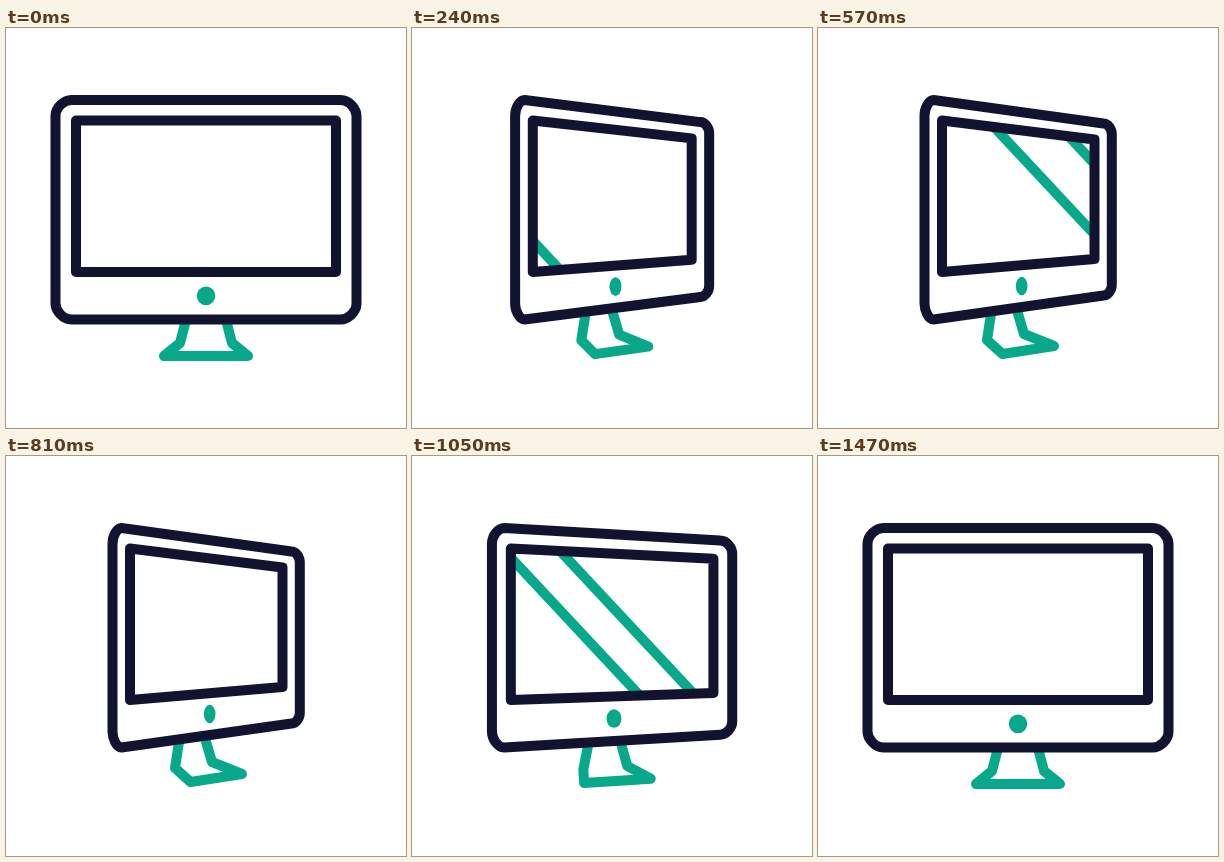
Animation of 400x400 px, one loop 1.62 s. Source, as an HTML page:

```html
<!DOCTYPE html>
<html lang="en">
<head>
<meta charset="utf-8">
<title>Turning monitor</title>
<style>
  html, body { margin: 0; height: 100%; overflow: hidden; background: #fff; }
  svg { display: block; width: 100%; height: 100%; }
  path { fill: none; stroke-width: 10; stroke-linejoin: round; }
  .dark { stroke: #121331; }
  .green { stroke: #08a88a; }
</style>
</head>
<body>
<svg viewBox="0 0 400 400">
  <clipPath id="glass"><path id="glassShape"/></clipPath>
  <path id="stand" class="green"/>
  <path id="streaks" class="green" clip-path="url(#glass)"/>
  <path id="screen" class="dark"/>
  <path id="body" class="dark"/>
  <ellipse id="dot" ry="9.3" fill="#08a88a"/>
</svg>
<script>
const LOOP = 1620, STEP = 30, TURN = 290, TURN_END = 1200;
const STREAK_SPEED = 0.69, STREAK_SLOPE = 1.07;

// Each sweep: a moment and where its two streaks cross y = 97 then.
const sweeps = [
  { time: 390, xs: [116, 50] },
  { time: 1050, xs: [150, 94.5] }
];

const $ = id => document.getElementById(id);
const mix = (a, b, k) => a + (b - a) * k;
const easeInOut = u => u < 0.5 ? 2 * u * u : 1 - 2 * (1 - u) ** 2;

// Fraction of the turn: out, hold, and back again.
function turnAt(t) {
  const u = Math.min(t, TURN_END - t) / TURN;
  return easeInOut(Math.max(0, Math.min(1, u)));
}

function setPath(id, d) {
  $(id).setAttribute('d', d);
}

function bodyPath(k) {
  const left = mix(49.5, 106.5, k), right = mix(350.5, 293.8, k);
  const x1 = mix(65.5, 115.5, k), x2 = mix(334.5, 285.5, k);
  const top = mix(72, 95.5, k), bottom = mix(291.5, 267.5, k);
  const y1 = mix(88, 106, k), y2 = mix(275.5, 257, k);
  const bow = 0.45;
  const corner = (ax, ay, bx, by, vertical) => vertical
    ? `C${ax} ${mix(by, ay, bow)} ${mix(ax, bx, 1 - bow)} ${by} ${bx} ${by}`
    : `C${mix(bx, ax, bow)} ${ay} ${bx} ${mix(ay, by, 1 - bow)} ${bx} ${by}`;
  return `M${x1} 72L${x2} ${top}` + corner(x2, top, right, y1) +
    `V${y2}` + corner(right, y2, x2, bottom, true) +
    `L${x1} 291.5` + corner(x1, 291.5, left, 275.5) +
    'V88' + corner(left, 88, x1, 72, true) + 'Z';
}

function screenPath(k) {
  const left = mix(70, 124, k), right = mix(330, 276.5, k);
  return `M${left} 92.5L${right} ${mix(92.5, 111.5, k)}` +
    `V${mix(244, 231, k)}L${left} 244Z`;
}

const standFront = [[180, 292], [174, 315], [158, 328], [242, 328], [226, 315], [220, 292]];
const standTurned = [[173, 286], [169, 312], [184.5, 326], [236, 318], [206, 306], [199.5, 284]];

function standPath(k) {
  return 'M' + standFront.map(([x, y], i) =>
    `${mix(x, standTurned[i][0], k)} ${mix(y, standTurned[i][1], k)}`).join('L');
}

function streakPath(t) {
  const pointAt = (x, y) => `${x + (y - 97) / STREAK_SLOPE} ${y}`;
  return sweeps.flatMap(({ time, xs }) => xs.map(x0 => {
    const x = x0 + (t - time) * STREAK_SPEED;
    return `M${pointAt(x, 70)}L${pointAt(x, 270)}`;
  })).join('');
}

function draw(t) {
  const k = turnAt(t), screen = screenPath(k);
  setPath('body', bodyPath(k));
  setPath('screen', screen);
  setPath('glassShape', screen);
  setPath('stand', standPath(k));
  setPath('streaks', streakPath(t));
  $('dot').setAttribute('cx', mix(200, 203.7, k));
  $('dot').setAttribute('cy', mix(267.8, 258, k));
  $('dot').setAttribute('rx', mix(9.3, 5.8, k));
}

function tick() {
  const t = performance.now() % LOOP;
  draw(Math.floor(t / STEP) * STEP);
  requestAnimationFrame(tick);
}
tick();
</script>
</body>
</html>
```
